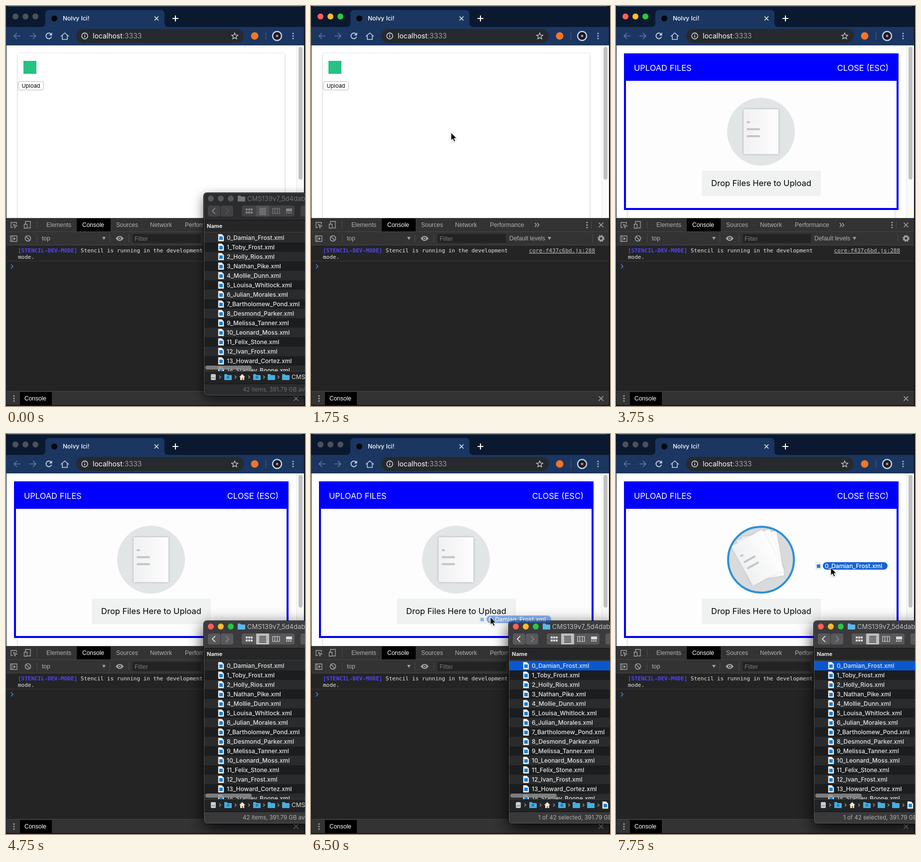
These frames come from a looping animation (600 by 802 pixels, 8 s). An HTML page:

```html
<!DOCTYPE html>
<html lang="en">
<head>
<meta charset="utf-8">
<title>File upload demo</title>
<style>
html, body { margin: 0; width: 100%; height: 100%; overflow: hidden; background: #111; }
svg { display: block; }
text { font: 12px Inter, sans-serif; white-space: pre; }
.dev text { font: 12px "Liberation Sans", Arial, sans-serif; fill: #adb0b3; }
.dev .log { font: 11px "DejaVu Sans Mono", monospace; fill: #e6e6e6; }
.dev .on { fill: #fff; }
.line { fill: none; stroke-width: 1.6; }
.modal text { font-size: 16.5px; }
.row { font-weight: 500; fill: #e6e6e6; }
</style>
</head>
<body>
<svg id="stage" width="600" height="802" viewBox="0 0 600 802"></svg>
<script>
const rect = (x, y, w, h, fill, r = 0, more = '') =>
  `<rect x="${x}" y="${y}" width="${w}" height="${h}" fill="${fill}" rx="${r}" ${more}/>`;
const dot = (x, y, r, fill, more = '') => `<circle cx="${x}" cy="${y}" r="${r}" fill="${fill}" ${more}/>`;
const text = (x, y, s, more = '') => `<text x="${x}" y="${y}" ${more}>${s}</text>`;
const line = (d, color, more = '') => `<path class="line" d="${d}" stroke="${color}" ${more}/>`;
const fill = (d, color, more = '') => `<path d="${d}" fill="${color}" ${more}/>`;
const group = (id, body, more = '') => `<g id="${id}" ${more}>${body}</g>`;
const menu = (x, y, step, color) => [-step, 0, step].map(d => dot(x, y + d, 1.6, color)).join('');
const cross = (x, y, r, color) => line(`M${x - r} ${y - r}l${2 * r} ${2 * r}m0 ${-2 * r}l${-2 * r} ${2 * r}`, color);
const lights = (y, xs, r) => xs.map((x, i) => dot(x, y, r, '#555', `data-light="${i}"`)).join('');
const fileIcon = (x, y) =>
  fill(`M${x} ${y}h7l4 4v10h-11z`, '#f4f6f8', 'stroke="#c3c7cc" stroke-width=".6"') + rect(x + 2, y + 4.5, 7, 7, '#1b7fd0');
const folder = (x, y, color = '#45aee0') =>
  fill(`M${x} ${y + 1}q0 -1 1 -1h4l2 2h7q1 0 1 1v8q0 1 -1 1h-13q-1 0 -1 -1z`, color);
const shadow = (id, dy, blur, opacity) => `<filter id="${id}" x="-40%" y="-40%" width="180%" height="180%">
  <feDropShadow dx="0" dy="${dy}" stdDeviation="${blur}" flood-opacity="${opacity}"/></filter>`;

const defs = `<defs>
  ${shadow('soft', 1, 2, .25)} ${shadow('faint', 0, 2, .09)}
  ${shadow('deep', 7, 11, .6)} ${shadow('deepest', 9, 16, .85)}
  <linearGradient id="sheet"><stop stop-color="#f0f1f2"/><stop offset="1" stop-color="#fdfdfd"/></linearGradient>
  <clipPath id="pageClip"><path d="M0 79h584v346h-584z"/></clipPath>
  <clipPath id="listClip"><path d="M398 454h202v278h-202z"/></clipPath>
  <clipPath id="discClip"><circle cx="291" cy="252" r="67"/></clipPath>
</defs>`;

function browser() {
  const blue = '#a9b9d3', bar = '#1a3661';
  return rect(0, 0, 598, 801, '#0b1930', 5) + line('M4 .5h590', '#56606e', 'style="stroke-width:1"')
    + lights(21, [19, 39, 59], 6)
    + fill('M71 42q8 0 8 -8v-18q0 -8 8 -8h223q8 0 8 8v18q0 8 8 8z', bar) + rect(0, 42, 598, 37, bar)
    + dot(97, 25, 6, '#05070a') + text(114, 29, 'Nolvy Ici!', 'fill="#fff" style="font-weight:500"')
    + cross(302, 25, 4, '#e6ecf5') + line('M340 19v12m-6 -6h12', '#fff', 'style="stroke-width:2"')
    + line('M29 60h-13m6 -6l-6 6l6 6M47 60h13m-6 -6l6 6l-6 6', '#5f789d')
    + line('M90 56a5.600 5.600 0 1 0 1.300 5.500', '#c4d0e2', 'style="stroke-width:1.9"') + fill('M92.500 53v6h-6z', '#c4d0e2')
    + line('M110 61l8 -7l8 7M113 59v8h10v-8', '#c4d0e2')
    + rect(141, 46, 336, 28, '#26292d', 14)
    + dot(158, 60, 6, 'none', 'stroke="#e3e5e8" stroke-width="1.4"') + line('M158 59v4M158 56v1.5', '#e3e5e8')
    + text(174, 65, 'localhost<tspan fill="#9aa0a6">:3333</tspan>', 'fill="#fff" style="font-size:14px"')
    + line('M459 54l1.8 4.2l4.5 .4l-3.4 3l1 4.4l-3.9 -2.4l-3.9 2.4l1 -4.4l-3.4 -3l4.5 -.4z', '#c8ccd1', 'style="stroke-width:1.3"')
    + dot(499, 60, 7.5, '#f37626') + rect(521, 52, 1, 16, '#48628c')
    + dot(544, 60, 9, '#17191f', 'stroke="#b8d4ef" stroke-width="2.5"') + dot(544, 60, 2.5, '#d97b82')
    + menu(576, 60, 5, blue);
}

function page() {
  return rect(1, 79, 597, 346, '#fff')
    + group('', rect(24, 95, 535, 360, '#fff', 3, 'filter="url(#soft)"'), 'clip-path="url(#pageClip)"')
    + rect(35, 110, 26, 26, '#26c281')
    + rect(24.5, 151.5, 51, 17, '#fff', 3.5, 'stroke="#b9b9b9"')
    + text(50, 164, 'Upload', 'text-anchor="middle" style="font-size:11px"')
    + rect(583, 79, 15, 346, '#fafafa') + rect(583, 79, 1, 346, '#e6e6e6') + rect(587, 82, 8, 266, '#c1c1c1', 4);
}

function sheet(id, marks = '') {
  return group(id, rect(-35, -45, 70, 90, 'url(#sheet)', 0, 'filter="url(#faint)"') + marks);
}

function modal() {
  const marks = rect(-29, -21, 7, 4, '#c4c5c6', 2) + rect(-29, -7, 27, 4, '#c4c5c6', 2) + rect(-29, 7, 27, 4, '#c4c5c6', 2);
  return rect(16, 95, 551, 314, '#00f') + rect(20, 150, 543, 255, '#fdfdfd')
    + text(36, 130, 'UPLOAD FILES', 'fill="#fff"') + text(547, 130, 'CLOSE (ESC)', 'fill="#fff" text-anchor="end"')
    + dot(291, 252, 68, '#e1e5e6', 'id="disc"')
    + group('', sheet('back') + sheet('mid') + sheet('front', marks), 'clip-path="url(#discClip)"')
    + dot(291, 252, 66, 'none', 'id="ring" stroke="#2b91d6" stroke-width="4"')
    + rect(172, 330, 239, 51, '#f0f1f1', 4) + text(291.5, 361, 'Drop Files Here to Upload', 'text-anchor="middle"');
}

function devtools() {
  const gray = '#a0a3a6', arrow = (x, y) => fill(`M${x} ${y}h7l-3.5 6z`, gray);
  const tabs = [[81, 'Elements'], [221, 'Sources'], [289, 'Network'], [359, 'Performance']];
  return rect(1, 425, 597, 375, '#242424') + rect(1, 425, 597, 55, '#333')
    + [425, 452, 479].map(y => rect(1, y, 597, 1, '#464646')).join('')
    + rect(142, 426, 68, 26, '#000') + tabs.map(([x, s]) => text(x, 443, s)).join('') + text(153, 443, 'Console', 'class="on"')
    + line('M21 438v-4h-11v10h4M15 438l7 3l-3 1l-1 3z', gray, 'style="stroke-width:1.3"')
    + line('M39 438v-6h10v13h-5M36.500 437.500h6v8h-6z', gray, 'style="stroke-width:1.3"')
    + rect(62, 431, 1, 16, '#4b4b4b') + line('M449 435l3.500 4l-3.500 4m5 -8l3.500 4l-3.500 4', gray)
    + menu(554, 439, 5, gray) + rect(562, 431, 1, 16, '#4b4b4b') + cross(582, 439, 4.5, gray)
    + line('M9 461h13v11h-13zM12 461v11', gray, 'style="stroke-width:1.3"') + fill('M15 463.500l5 3l-5 3z', gray)
    + dot(44, 466, 5.5, 'none', `stroke="${gray}" stroke-width="1.6"`) + line('M40 462l8 8', gray)
    + rect(62, 458, 1, 16, '#4b4b4b') + rect(208, 458, 1, 16, '#4b4b4b') + rect(246, 458, 1, 16, '#4b4b4b')
    + text(72, 470, 'top') + arrow(193, 463)
    + fill('M220 466q8 -10 16 0q-8 10 -16 0z', gray) + dot(228, 466, 3, '#333') + dot(228, 466, 1.6, gray)
    + rect(254, 457, 137, 18, '#232323') + text(258, 471, 'Filter', 'style="fill:#77797b"')
    + text(398, 470, 'Default levels') + arrow(475, 463) + rect(565, 458, 1, 16, '#4b4b4b')
    + dot(582, 466, 4, 'none', `stroke="${gray}" stroke-width="3"`)
    + dot(582, 466, 6, 'none', `stroke="${gray}" stroke-width="2" stroke-dasharray="2.360"`)
    + text(24, 494, '<tspan fill="#4f46ff" font-weight="bold">[STENCIL-DEV-MODE]</tspan> Stencil is running in the development', 'class="log"')
    + text(24, 507, 'mode.', 'class="log"')
    + text(570, 494, 'core-f437c6bd.js:288', 'class="log" text-anchor="end" text-decoration="underline" style="fill:#c4c4c4"')
    + rect(1, 511, 597, 1, '#3a3a3a') + line('M10 518l4 4l-4 4', '#3a82f6')
    + rect(1, 772, 597, 28, '#333') + rect(1, 772, 597, 1, '#464646') + menu(16, 787, 5, gray)
    + rect(28, 774, 64, 26, '#000') + text(37, 791, 'Console', 'class="on"') + cross(582, 787, 4.5, gray);
}

const people = ['Damian_Frost', 'Toby_Frost', 'Holly_Rios', 'Nathan_Pike', 'Mollie_Dunn', 'Louisa_Whitlock',
  'Julian_Morales', 'Bartholomew_Pond', 'Desmond_Parker', 'Melissa_Tanner', 'Leonard_Moss', 'Felix_Stone',
  'Ivan_Frost', 'Howard_Cortez', 'Stanley_Boone'];
const files = people.map((name, i) => `${i}_${name}.xml`);

function finder() {
  const rows = files.map((name, i) => {
    const y = 455 + 19 * i;
    return rect(398, y, 202, 19, i % 2 ? '#1c1d1e' : '#2a2b2c', 0, i ? '' : 'id="firstRow"')
      + fileIcon(426, y + 2.5) + text(443, y + 14, name, 'class="row"');
  }).join('');
  const icon = '#d8d8d8', dim = '#8e8e8e';
  const grid = [0, 1, 2].map(i => rect(481 + i * 5, 406, 4, 4, icon) + rect(481 + i * 5, 412, 4, 4, icon)).join('');
  const list = [405, 408, 411, 414, 417].map(y => rect(508, y, 14, 1.3, 'currentColor')).join('');
  const tools = rect(405, 400, 25, 22, '#59595b', 4) + rect(431, 400, 25, 22, '#59595b', 4)
    + line('M420 405l-6 6l6 6', '#eee') + line('M441 405l6 6l-6 6', '#858587')
    + rect(473, 400, 106, 22, '#59595b', 4) + rect(502, 400, 26, 22, '#bebebf', 0, 'id="chosen"') + grid + group('listIcon', list)
    + line('M535 406h14v10h-14zM539.500 406v10m5 -10v10', icon, 'style="stroke-width:1.2"')
    + rect(562, 406, 12, 6, icon) + [562, 566, 570].map(x => rect(x, 414, 3, 2, icon)).join('')
    + rect(591, 400, 20, 22, '#59595b', 4);
  const crumbs = [429, 460, 487, 517, 546].map(x => line(`M${x - 1} 741l3 3l-3 3`, dim)).join('');
  return rect(397, 375, 220, 406, '#252627', 6, 'id="frame"')
    + fill('M397 429v-48q0 -6 6 -6h197v54z', '#3b3b3d', 'id="head"')
    + lights(386, [411, 431, 451], 6) + group('headFolder', folder(465, 380, 'currentColor'))
    + text(484, 391, 'CMS139v7_5d4dabc', 'id="headText" style="font-size:13px"')
    + group('tools', tools) + rect(397, 429, 203, 1, '#111')
    + text(403, 445, 'Name', 'fill="#e4e4e4" style="font-size:11px;font-weight:700"') + rect(397, 453, 203, 1, '#444')
    + group('', rows, 'clip-path="url(#listClip)"') + rect(400, 721, 93, 8, '#8c8c8c', 4, 'opacity=".85"')
    + rect(398, 732, 202, 25, '#222324') + rect(398, 732, 202, 1, '#3c3c3c') + crumbs
    + rect(411, 738, 10, 12, '#c9cbcd', 2) + rect(412, 745, 8, 1, '#666')
    + folder(438, 738) + folder(496, 738) + folder(525, 738) + folder(554, 738)
    + rect(443, 742, 5, 5, '#2380b5') + rect(501, 742, 5, 5, '#2380b5')
    + fill('M468 744l6 -6l6 6h-2v6h-8v-6z', '#eee8dc') + rect(473, 746, 3, 4, '#c07a3a')
    + text(573, 748, 'CMS139v7', 'id="crumbText" fill="#ddd"')
    + group('crumbFile', line('M575 741l3 3l-3 3', dim) + fileIcon(585, 737))
    + fill('M398 757h202v24h-196q-6 0 -6 -6z', '#343436', 'id="foot"') + rect(398, 757, 202, 1, '#111')
    + text(0, 773, '', 'id="status" style="font-size:11.5px"')
    + rect(396.5, 374.5, 220, 407, 'none', 6, 'stroke="#000"') + rect(397.5, 375.5, 219, 405, 'none', 5, 'stroke="#5c5d5f"');
}

const drag = fileIcon(-30, -12) + rect(-16, -12, 130, 15, '#1763d6', 7.5)
  + text(-12, 0, files[0], 'class="row" style="fill:#fff"');
const pointer = fill('M0 0v15.500l3.600 -3.300l2.500 5.700l2.700 -1.200l-2.500 -5.500h5z', '#000',
  'stroke="#fff" stroke-width="1" filter="url(#soft)"');

const stage = document.getElementById('stage');
stage.innerHTML = defs + group('browser', browser()) + page() + group('modal', modal(), 'class="modal"')
  + group('', devtools(), 'class="dev"') + group('finder', finder()) + group('drag', drag) + group('pointer', pointer);

const el = id => document.getElementById(id);
const show = (id, on) => el(id).setAttribute('display', on ? 'inline' : 'none');
const set = (id, name, value) => el(id).setAttribute(name, value);
const place = (id, x, y, turn = 0) => set(id, 'transform', `translate(${x} ${y}) rotate(${turn})`);

function paintLights(id, on) {
  document.querySelectorAll(`#${id} [data-light]`).forEach((c, i) =>
    c.setAttribute('fill', on ? ['#ff5f57', '#febc2e', '#28c840'][i] : id === 'browser' ? '#4c525d' : '#58595a'));
}

// Pointer samples, one every 250 ms, for each visible stretch
const tracks = {
  4: [[238, 247], [252, 243], [275, 246], [281, 254], [274, 281], [55, 193], [43, 163], [50, 163], [48, 165], [49, 168], [303, 487]],
  21: [[522, 457], [511, 468], [505, 468], [453, 468], [453, 468], [360, 367], [321, 305], [318, 262], [372, 252], [411, 258], [431, 268]]
};
const fan = { back: [4, -7, -10], mid: [-1, -7, -19], front: [-7, -4, -29] };

function draw(now) {
  const step = Math.floor(now % 8000 / 250);
  const start = step < 21 ? 4 : 21, at = tracks[start][step - start];
  const withFinder = step < 4 || step >= 19, finderOn = step >= 19, picked = step >= 23;

  paintLights('browser', !withFinder);
  paintLights('finder', finderOn);
  show('finder', withFinder);
  set('frame', 'filter', `url(#${finderOn ? 'deepest' : 'deep'})`);
  set('head', 'fill', finderOn ? '#3b3b3d' : '#2b2c2d');
  set('foot', 'fill', finderOn ? '#39393b' : '#2b2c2d');
  set('tools', 'opacity', finderOn ? 1 : .5);
  set('chosen', 'fill', finderOn ? '#bebebf' : '#77777a');
  set('listIcon', 'color', finderOn ? '#222' : '#eee');
  set('headFolder', 'color', finderOn ? '#5bb8e8' : '#777');
  set('headText', 'fill', finderOn ? '#c2c2c2' : '#737475');
  set('firstRow', 'fill', picked ? '#0a58d0' : '#2a2b2c');
  show('crumbText', !picked);
  show('crumbFile', picked);
  set('status', 'x', picked ? 456 : 475);
  set('status', 'fill', finderOn ? '#b0b0b0' : '#6c6d6e');
  el('status').textContent = (picked ? '1 of 42 selected' : '42 items') + ', 391.79 GB available';

  show('modal', step >= 12);
  const open = Math.max(0, Math.min(1, (step - 27) * .4));
  for (const id in fan) {
    const [x, y, turn] = fan[id];
    place(id, 291 + x * open, 252 + y * open, turn * open);
  }
  show('ring', open > 0);
  set('disc', 'fill', open ? '#d9dadb' : '#e1e5e6');

  show('pointer', at);
  show('drag', step >= 26);
  if (at) {
    const lag = step === 26 ? 8 : 0;
    place('pointer', ...at);
    place('drag', at[0] + lag, at[1] + lag + 1);
    set('drag', 'opacity', lag ? .5 : 1);
  }
}

const begin = performance.now();
function loop() {
  draw(performance.now() - begin);
  requestAnimationFrame(loop);
}
loop();
</script>
</body>
</html>
```
